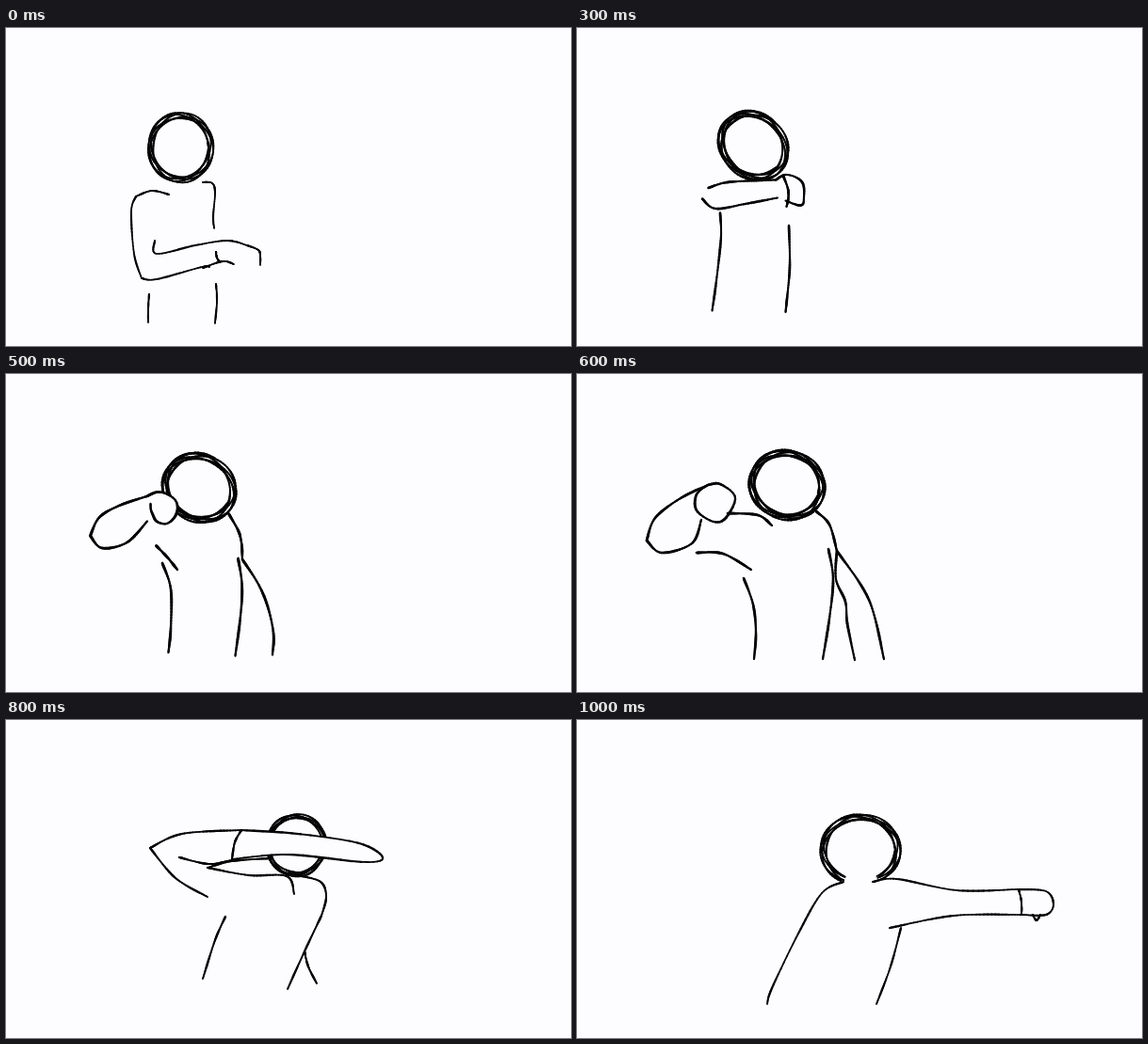
These frames come from a looping animation (600x338 px, 1100 ms). An HTML page with a canvas:

```html
<!DOCTYPE html>
<html lang="en">
<head>
<meta charset="utf-8">
<title>Sketched punch</title>
<style>
html, body { margin: 0; width: 100%; height: 100%; overflow: hidden; background: #fdfcfe; }
canvas { display: block; width: 600px; height: 338px; }
</style>
</head>
<body>
<canvas id="stage" width="600" height="338"></canvas>
<script>
const PAPER = '#fdfcfe', INK = '#050505', STEP = 100, SAMPLES = 40;
const ctx = document.getElementById('stage').getContext('2d');
ctx.lineCap = ctx.lineJoin = 'round';

const lerp = (a, b, t) => a + (b - a) * t;

// Evenly stepped samples of a Catmull-Rom curve through flat x, y key points
function curve(keys) {
  const last = keys.length / 2 - 1;
  const key = (i, k) => keys[2 * Math.max(0, Math.min(last, i)) + k];
  return Array.from({ length: SAMPLES + 1 }, (_, s) => {
    const u = s / SAMPLES * last, i = Math.min(last - 1, Math.floor(u)), t = u - i;
    return [0, 1].map(k => {
      const a = key(i - 1, k), b = key(i, k), c = key(i + 1, k), d = key(i + 2, k);
      return b + t / 2 * (c - a + t * (2 * a - 5 * b + 4 * c - d + t * (3 * (b - c) + d - a)));
    });
  });
}

// head: x, y, rx, ry, tilt, loops, spread, and the sine above which the neck stays open
function pose(pen, head, keys) {
  const parts = {};
  for (const name in keys) parts[name] = curve(keys[name]);
  return { pen, head, parts };
}

// Drawing halfway between two poses, from the parts they share
function between(a, b) {
  const parts = {};
  for (const name in a.parts) {
    if (!b.parts[name]) continue;
    parts[name] = a.parts[name].map((p, i) => p.map((v, k) => lerp(v, b.parts[name][i][k], 0.5)));
  }
  return { pen: lerp(a.pen, b.pen, 0.5), head: a.head.map((v, i) => lerp(v, b.head[i], 0.5)), parts };
}

const guard = pose(1.9, [185.5, 127, 35, 37.5, 0, 5, 0.17, 2], {
  top: [158, 226, 160, 240, 201, 231, 235, 226, 256, 231],
  fist: [256, 231, 268, 236, 270, 243, 270, 252],
  under: [144, 266, 160, 267, 208, 254, 216, 254],
  shoulder: [173, 177, 155, 173, 138, 179],
  elbow: [138, 179, 133, 195, 136, 240, 144, 266],
  thumb: [209, 255, 230, 248, 242, 251],
  palm: [223, 238, 224, 244, 227, 249],
  neck: [209, 164, 219, 165, 222, 175, 220, 200, 221, 213],
  back: [152, 283, 151, 298, 151, 313],
  front: [223, 272, 224, 290, 222, 314]
});

const reach = pose(2, [187, 126, 40, 33.5, 0.8, 5, 0.17, 2], {
  top: [174, 173, 198, 177, 230, 177, 262, 181],
  fist: [262, 181, 272, 182, 287, 206, 275, 209],
  under: [161, 196, 180, 204, 222, 196, 258, 203],
  shoulder: [179, 165, 165, 157, 152, 159],
  elbow: [145, 174, 148, 182, 154, 188],
  thumb: [253, 206, 262, 209, 272, 210],
  neck: [219, 163, 220, 168, 219, 174],
  back: [149, 208, 139, 255, 130, 312],
  front: [224, 214, 223, 265, 218, 302, 217, 308]
});

const cross = pose(2.7, [187.5, 124, 40, 35.5, 0.7, 4.5, 0.18, 2], {
  top: [105, 167, 115, 152, 130, 148, 160, 142],
  fist: [160, 142, 177, 132, 203, 142, 196, 163, 188, 168, 168, 158],
  under: [105, 167, 114, 180, 135, 178, 168, 158],
  chest: [192, 175, 188, 199, 179, 208],
  neck: [219, 151, 228, 175, 229, 192, 226, 206],
  back: [155, 185, 163, 212, 160, 265, 157, 289],
  front: [226, 206, 230, 245, 226, 296],
  armOut: [226, 206, 242, 236, 250, 282, 240, 294],
  tail: [165, 86, 170, 83, 182, 92]
});

const lean = pose(2.5, [223, 118, 41, 37, 0.3, 5, 0.17, 2], {
  top: [74, 177, 83, 153, 110, 132, 139, 118],
  fist: [139, 118, 152, 117, 168, 131, 158, 153, 145, 157, 127, 145, 127, 128, 139, 118],
  under: [74, 177, 90, 190, 122, 180, 132, 155],
  shoulder: [160, 148, 192, 150, 207, 161],
  chest: [127, 190, 155, 191, 185, 208],
  neck: [254, 146, 268, 160, 276, 188],
  back: [177, 217, 187, 245, 190, 275, 188, 303],
  front: [267, 186, 272, 218, 268, 260, 261, 303],
  armOut: [276, 188, 310, 240, 326, 303],
  armIn: [276, 188, 275, 218, 285, 242, 287, 265, 295, 304]
});

const raise = pose(2.2, [268, 125.5, 40, 34, 0.15, 3, 0.12, 2], {
  fist: [152, 147, 145, 133, 163, 119, 182, 130, 180, 143, 164, 149, 152, 147],
  forearm: [152, 147, 149, 172, 160, 188, 180, 184, 184, 165, 177, 147],
  shoulder: [183, 157, 225, 154, 250, 161, 257, 176],
  chest: [176, 190, 210, 204, 237, 228],
  neck: [293, 155, 312, 168, 316, 185],
  back: [223, 213, 222, 258, 211, 304],
  front: [300, 177, 304, 210, 292, 304],
  armOut: [316, 185, 350, 230, 385, 295],
  armIn: [304, 222, 322, 232, 342, 271, 366, 295]
});

const swing = pose(2.1, [308.5, 133, 32, 33.5, 0, 4, 0.14, 2], {
  top: [153, 136, 187, 121, 250, 117],
  fist: [250, 117, 310, 121, 375, 131, 400, 146, 380, 151, 300, 143, 240, 148],
  under: [184, 146, 215, 153, 240, 149],
  cuff: [250, 117, 243, 130, 240, 148],
  elbow: [153, 136, 180, 168, 214, 188],
  sleeve: [281, 147, 240, 150, 214, 157],
  shoulder: [214, 157, 258, 165, 298, 166, 306, 185],
  neck: [310, 165, 334, 172, 340, 188, 335, 208],
  back: [233, 209, 222, 234, 209, 275],
  front: [335, 208, 317, 246, 299, 286],
  armOut: [317, 246, 321, 262, 330, 280]
});

const punch = pose(2, [301, 138, 43, 38, 0, 5, 0.16, 0.9], {
  top: [314, 172, 340, 169, 403, 181, 468, 180],
  fist: [468, 180, 498, 182, 506, 196, 498, 207, 473, 207],
  under: [332, 221, 400, 208, 472, 207],
  cuff: [469, 180, 472, 193, 472, 207],
  thumb: [484, 207, 488, 213, 492, 207],
  back: [283, 172, 260, 184, 235, 227, 207, 285, 202, 302],
  front: [344, 221, 333, 262, 318, 302]
});

const frames = [
  guard, between(guard, reach),
  reach, between(reach, cross),
  cross, between(cross, lean),
  lean, raise,
  swing, between(swing, punch),
  punch
];

// Pen stroke whose pressure swells gently along its length
function stroke(points, pen) {
  for (let i = 1; i < points.length; i++) {
    ctx.lineWidth = pen * (1 + 0.15 * Math.sin(i * 0.45));
    ctx.beginPath();
    ctx.moveTo(...points[i - 1]);
    ctx.lineTo(...points[i]);
    ctx.stroke();
  }
}

// Several loose loops drawn round the head
function scribble([x, y, rx, ry, tilt, loops, spread, open], pen) {
  const c = Math.cos(tilt), s = Math.sin(tilt);
  let run = [];
  for (let a = 0; a < loops * 2 * Math.PI; a += 0.08) {
    if (Math.sin(a) > open) {
      stroke(run, pen);
      run = [];
      continue;
    }
    const r = 1 - spread * (0.5 + 0.5 * Math.sin(a * 1.62 + 1));
    const u = rx * r * Math.cos(a), v = ry * r * Math.sin(a);
    run.push([x + u * c - v * s, y + u * s + v * c]);
  }
  stroke(run, pen);
}

// The leading arm hides the head behind it
function maskArm({ top, fist, under }) {
  if (!top) return;
  ctx.beginPath();
  for (const p of [...top, ...fist, ...under.slice().reverse()]) ctx.lineTo(...p);
  ctx.fill();
}

const start = performance.now();

function draw() {
  const t = Math.max(0, performance.now() - start);
  const { pen, head, parts } = frames[Math.floor(t / STEP) % frames.length];
  ctx.fillStyle = PAPER;
  ctx.strokeStyle = INK;
  ctx.fillRect(0, 0, 600, 338);
  scribble(head, Math.min(pen, 2.2));
  maskArm(parts);
  for (const name in parts) stroke(parts[name], pen);
  requestAnimationFrame(draw);
}
draw();
</script>
</body>
</html>
```
